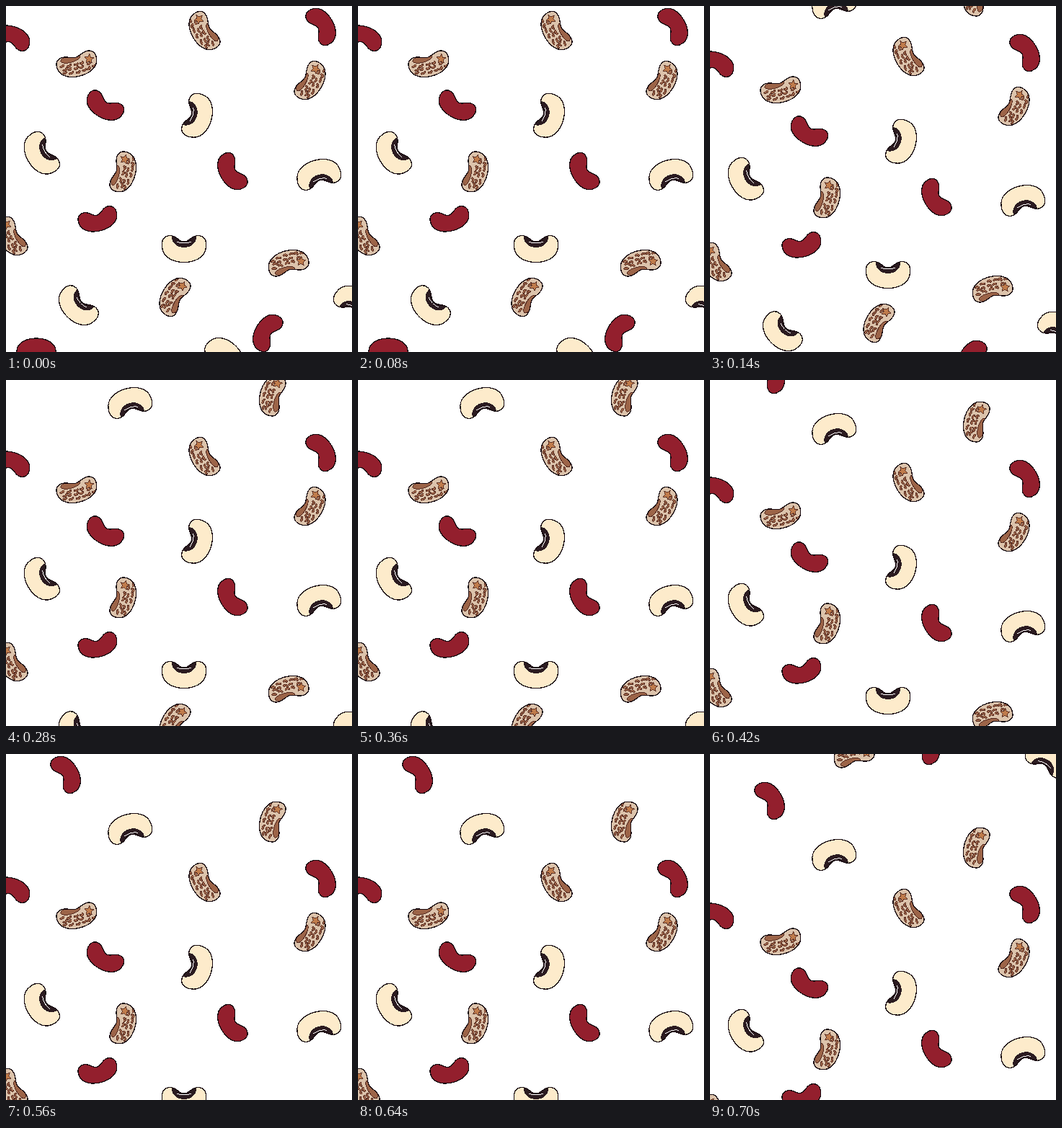
These frames come from a looping animation (480 by 480 pixels, 0.84 s). An HTML page:

```html
<!DOCTYPE html>
<html lang="en">
<head>
<meta charset="utf-8">
<title>Falling beans</title>
<style>
  html, body { margin: 0; width: 100%; height: 100%; overflow: hidden; background: #fff; }
  svg { display: block; width: 100vw; height: 100vh; shape-rendering: crispEdges; }
</style>
</head>
<body>
<svg viewBox="0 0 480 480"><defs></defs><g id="field"></g></svg>
<script>
const STEP = 140, STEPS = 6, FALL = 36, TURN = 15;
const INK = '#180a10', BROWN = '#9c6448', DARK = '#54291f';
const defs = document.querySelector('defs');
const field = document.getElementById('field');

function add(parent, tag, attrs) {
  const node = document.createElementNS('http://www.w3.org/2000/svg', tag);
  for (const key in attrs) node.setAttribute(key, attrs[key]);
  return parent.appendChild(node);
}

function seeded(seed) {
  return () => (seed = seed * 16807 % 2147483647) / 2147483647;
}

// Bean outline: half width, half height, height of the notch; the notch faces up
function outline(w, h, notch) {
  const half = s => `M0 ${-notch}C${-.26 * w * s} ${-notch} ${-.33 * w * s} ${-h} ${-.63 * w * s} ${-h}`
    + `S${-1.04 * w * s} ${-.6 * h} ${-w * s} ${-.13 * h}C${-.96 * w * s} ${.67 * h} ${-.45 * w * s} ${h} 0 ${h}`;
  return half(1) + half(-1);
}

// Skin, then markings kept inside it, then the outline on top
function bean(id, color, size, mark) {
  const d = outline(...size);
  const group = add(defs, 'g', { id });
  add(add(defs, 'clipPath', { id: id + '-clip' }), 'path', { d });
  add(group, 'path', { d, fill: color });
  mark?.(add(group, 'g', { 'clip-path': `url(#${id}-clip)` }));
  add(group, 'path', { d, fill: 'none', stroke: INK, 'stroke-width': 1.3 });
}

function eye(g) {
  add(g, 'ellipse', { cy: -16, rx: 17, ry: 14, fill: '#2b1b20' });
  add(g, 'path', { d: 'M-10-10Q0-6 10-10', fill: 'none', stroke: '#fff' });
}

function speckles(g) {
  const rnd = seeded(7);
  let d = '';
  for (let row = 0; row < 3; row++) {
    for (let col = 0; col < 4 + row; col++) {
      const x = -23 + 8.6 * col + 3 * rnd();
      const y = -2 + 5.5 * row - x * x / 150 + 2 * rnd();
      d += `M${x} ${y}q${2 + rnd()} ${3 * rnd()} ${3 + 2 * rnd()} ${-2 * rnd()}`;
    }
  }
  const streak = { d, fill: 'none', 'stroke-linecap': 'round' };
  add(g, 'path', { ...streak, stroke: DARK, 'stroke-width': 3.2 });
  add(g, 'path', { ...streak, stroke: BROWN, 'stroke-width': 1.6 });
  add(g, 'ellipse', { cx: -7, cy: -11, rx: 14, ry: 5, fill: BROWN, stroke: DARK });

  const star = Array.from({ length: 10 }, (_, i) => {
    const r = i % 2 ? 3.2 : 7, a = i * Math.PI / 5;
    return [18 + r * Math.cos(a), -4 + r * Math.sin(a)];
  });
  add(g, 'polygon', { points: star.join(' '), fill: '#c07c4c', stroke: DARK, 'stroke-width': .9 });
}

// Each bean stands at x, y and is turned by a whole number of 15-degree notches
function scatter(kind, spots, flip = 1) {
  for (const [x, y, turn] of spots) {
    add(field, 'use', {
      href: '#' + kind,
      transform: `translate(${x} ${y}) rotate(${turn * TURN}) scale(1 ${flip})`
    });
  }
}

bean('kidney', '#931f2d', [27, 15, 7]);
bean('blackeye', '#fdebcb', [30.5, 18.5, 10], eye);
bean('pinto', '#dcc3ab', [28, 15.5, 11], speckles);

scatter('kidney', [
  [300, -193, 16], [85, -117, 16], [439, 27, 16], [7, 43, 13], [136, 140, 2],
  [312, 231, 4], [128, 297, -1], [361, 452, 8], [42, 476, 12]
]);
scatter('blackeye', [
  [469, -174, 14], [171, -42, 11], [267, 153, -5], [47, 206, 4], [433, 232, 11],
  [247, 337, 0], [486, 410, 14], [98, 418, 3], [306, 485, 15]
]);
scatter('pinto', [[99, 82, -1], [424, 105, -4], [164, 231, -5]]);
scatter('pinto', [
  [199, -181, -1], [368, -51, -5], [273, 36, -8], [6, 321, -8], [391, 355, -1], [232, 402, -4]
], -1);

// The beans drop in held steps, then jump back to the start
function draw(ms) {
  const step = Math.floor(ms / STEP) % STEPS;
  field.setAttribute('transform', `translate(0 ${step * FALL})`);
}

const start = performance.now();
function tick() {
  draw(performance.now() - start);
  requestAnimationFrame(tick);
}
tick();
</script>
</body>
</html>
```
